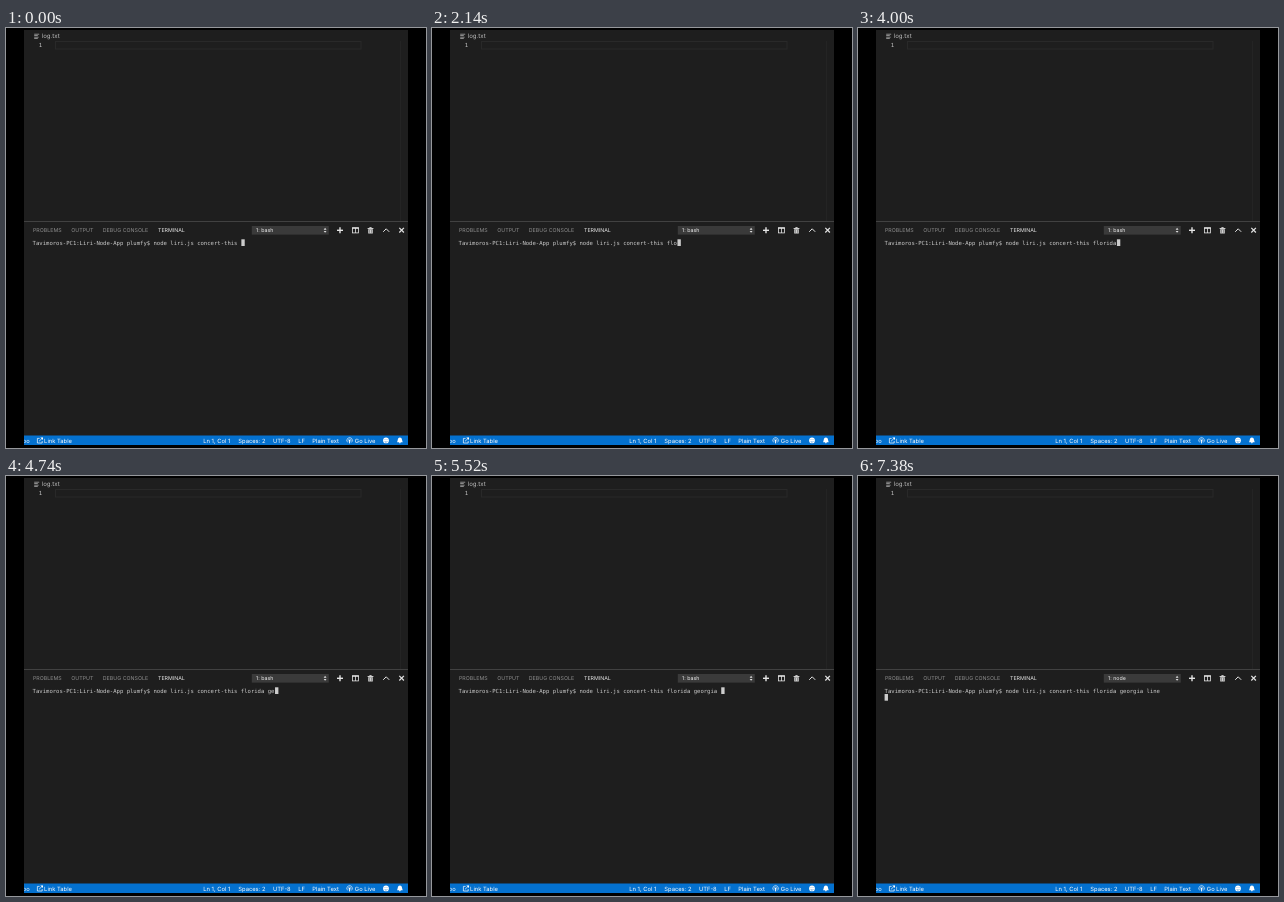
Write an HTML page with a canvas that moves like this. It is 420 by 420 pixels and loops after 8 s.

```html
<!DOCTYPE html>
<html lang="en">
<head>
<meta charset="utf-8">
<title>Terminal session</title>
<style>
  html, body { margin: 0; width: 100%; height: 100%; overflow: hidden; background: #000; }
  canvas { display: block; width: 420px; height: 420px; }
</style>
</head>
<body>
<canvas id="stage"></canvas>
<script>
const SIZE = 420, LOOP = 8000;
const UI = 'Inter, sans-serif', MONO = '"DejaVu Sans Mono", monospace';
const BACK = '#1e1e1e', BLUE = '#0471cf', WHITE = '#fff', LIGHT = '#e4e4e4';

const PROMPT = 'Tavimoros-PC1:Liri-Node-App plumfy$ node liri.js concert-this ';
const KEYS = 'flordi<<ida georgia line';   // "<" is backspace
const KEY_TIMES = [
  1840, 1940, 2140, 2260, 2520, 2540, 3180, 3320, 3660, 3800, 4000, 4180,
  4520, 4740, 4840, 4980, 5160, 5260, 5400, 5520, 5660, 5760, 5840, 5940
];
const ENTER = 7180, NODE_STARTS = 7380;
const TERM = { x: 26.6, y: 211.3, cell: 3.367, row: 6.7, size: 5.593 };

const canvas = document.getElementById('stage');
const ctx = canvas.getContext('2d', { alpha: false });
const dpr = window.devicePixelRatio || 1;
canvas.width = canvas.height = Math.round(SIZE * dpr);
ctx.scale(dpr, dpr);
ctx.textRendering = 'geometricPrecision';

function box(x, y, w, h, color) {
  ctx.fillStyle = color;
  ctx.fillRect(x, y, w, h);
}

function text(str, x, baseline, size, color, family = UI) {
  ctx.font = `${size}px ${family}`;
  ctx.fillStyle = color;
  ctx.fillText(str, x, baseline);
}

function line(color, width, ...points) {
  ctx.strokeStyle = color;
  ctx.lineWidth = width;
  ctx.beginPath();
  points.forEach(([x, y], i) => i ? ctx.lineTo(x, y) : ctx.moveTo(x, y));
  ctx.stroke();
}

function frame(x, y, w, h, color, width) {
  ctx.strokeStyle = color;
  ctx.lineWidth = width;
  ctx.strokeRect(x, y, w, h);
}

function shape(color, ...points) {
  ctx.fillStyle = color;
  ctx.beginPath();
  points.forEach(([x, y]) => ctx.lineTo(x, y));
  ctx.fill();
}

function disc(x, y, r, color) {
  ctx.fillStyle = color;
  ctx.beginPath();
  ctx.arc(x, y, r, 0, 2 * Math.PI);
  ctx.fill();
}

function arc(x, y, r, from, to, color, width) {
  ctx.strokeStyle = color;
  ctx.lineWidth = width;
  ctx.beginPath();
  ctx.arc(x, y, r, from, to);
  ctx.stroke();
}

function drawEditor() {
  box(18, 2, 384, 415, BACK);
  [[5, 2.6], [3.6, 4.1], [4.4, 5.6], [3.6, 7.1]].forEach(([w, y]) => box(28.2, y + 3.2, w, 0.7, '#b8b8b8'));
  text('log.txt', 35.7, 10.1, 6.1, '#bdbdbd');
  text('1', 32.7, 19.1, 5.6, '#c6c6c6', MONO);
  frame(49.5, 13.5, 305.5, 7.5, '#292929', 1);
  box(394, 13, 0.6, 180, '#282828');
}

function drawPanelIcons() {
  line(LIGHT, 1.4, [331, 202.3], [337, 202.3]);
  line(LIGHT, 1.4, [334, 199.3], [334, 205.3]);

  frame(346.5, 199.9, 6, 5, LIGHT, 0.8);
  box(346.1, 199.4, 6.8, 1.3, LIGHT);
  line(LIGHT, 0.8, [349.5, 200], [349.5, 205]);

  box(361.6, 200, 5.8, 0.9, LIGHT);
  box(363.4, 199.2, 2.2, 0.8, LIGHT);
  box(362.2, 201.2, 4.6, 4.3, '#cfcfcf');
  [363.4, 365.2].forEach(x => box(x, 201.8, 0.5, 3, '#555'));

  line(LIGHT, 1, [377.2, 203.8], [380.2, 200.8], [383.2, 203.8]);
  line(LIGHT, 1.2, [393.3, 199.9], [397.9, 204.5]);
  line(LIGHT, 1.2, [397.9, 199.9], [393.3, 204.5]);
}

function drawPanelHeader(process) {
  box(18, 193, 384, 1, '#414141');
  text('PROBLEMS', 26.9, 204.2, 5.3, '#8f8f8f');
  text('OUTPUT', 65.3, 204.2, 5.3, '#8f8f8f');
  text('DEBUG CONSOLE', 96.8, 204.2, 5.3, '#8f8f8f');
  text('TERMINAL', 152, 204.2, 5.3, '#e7e7e7');

  box(245.8, 198, 77, 8.6, '#3a3a3a');
  text('1: ' + process, 250, 204.2, 5.3, '#f0f0f0');
  shape(LIGHT, [317.7, 201.7], [319.1, 199.8], [320.5, 201.7]);
  shape(LIGHT, [317.7, 202.9], [319.1, 204.8], [320.5, 202.9]);
  drawPanelIcons();
}

function drawStatusBar() {
  const y = 412.4, base = 414.5, size = 5.8;
  const label = (str, x) => text(str, x, base, size, WHITE);
  box(18, 407.5, 384, 9.5, BLUE);

  ctx.save();
  ctx.beginPath();
  ctx.rect(18, 407, 20, 10);
  ctx.clip();
  label('oo', 16.8);
  ctx.restore();

  line(WHITE, 0.7, [33.6, 410.4], [31.4, 410.4], [31.4, 415], [36.2, 415], [36.2, 413]);
  line(WHITE, 0.7, [33, 413.3], [36.3, 410.2]);
  shape(WHITE, [34.3, 409.4], [37, 409.4], [37, 412.1]);

  label('Link Table', 38.1);
  label('Ln 1, Col 1', 197.2);
  label('Spaces: 2', 232.3);
  label('UTF-8', 266.9);
  label('LF', 292.2);
  label('Plain Text', 306.3);
  label('Go Live', 348.8);

  arc(343.6, y, 2.8, 0.75 * Math.PI, 2.25 * Math.PI, WHITE, 0.6);
  arc(343.6, y, 1.4, 0.75 * Math.PI, 2.25 * Math.PI, WHITE, 0.5);
  disc(343.6, y, 0.7, WHITE);
  box(343.1, y, 1, 3, WHITE);

  disc(380, y, 2.9, WHITE);
  disc(379, y - 0.8, 0.45, BLUE);
  disc(381, y - 0.8, 0.45, BLUE);
  arc(380, y + 0.2, 1.5, 0.15 * Math.PI, 0.85 * Math.PI, BLUE, 0.6);

  disc(393.9, 411.5, 2, WHITE);
  shape(WHITE, [391.9, 411.4], [395.9, 411.4], [396.7, 414.2], [391.1, 414.2]);
  disc(393.9, 414.6, 0.8, WHITE);
}

function typedAt(t) {
  let typed = '';
  KEY_TIMES.forEach((time, i) => {
    if (t >= time) typed = KEYS[i] === '<' ? typed.slice(0, -1) : typed + KEYS[i];
  });
  return typed;
}

function drawTerminal(t) {
  const command = PROMPT + typedAt(t);
  const entered = t >= ENTER;
  text(command, TERM.x, 216.5, TERM.size, '#cccccc', MONO);
  box(TERM.x + (entered ? 0 : command.length * TERM.cell),
      TERM.y + (entered ? TERM.row : 0), TERM.cell, TERM.row, '#cccccc');
}

function draw(t) {
  box(0, 0, SIZE, SIZE, '#000');
  drawEditor();
  drawPanelHeader(t >= NODE_STARTS ? 'node' : 'bash');
  drawTerminal(t);
  drawStatusBar();
}

const start = performance.now();
function tick() {
  draw((performance.now() - start) % LOOP);
  requestAnimationFrame(tick);
}
tick();
</script>
</body>
</html>
```
